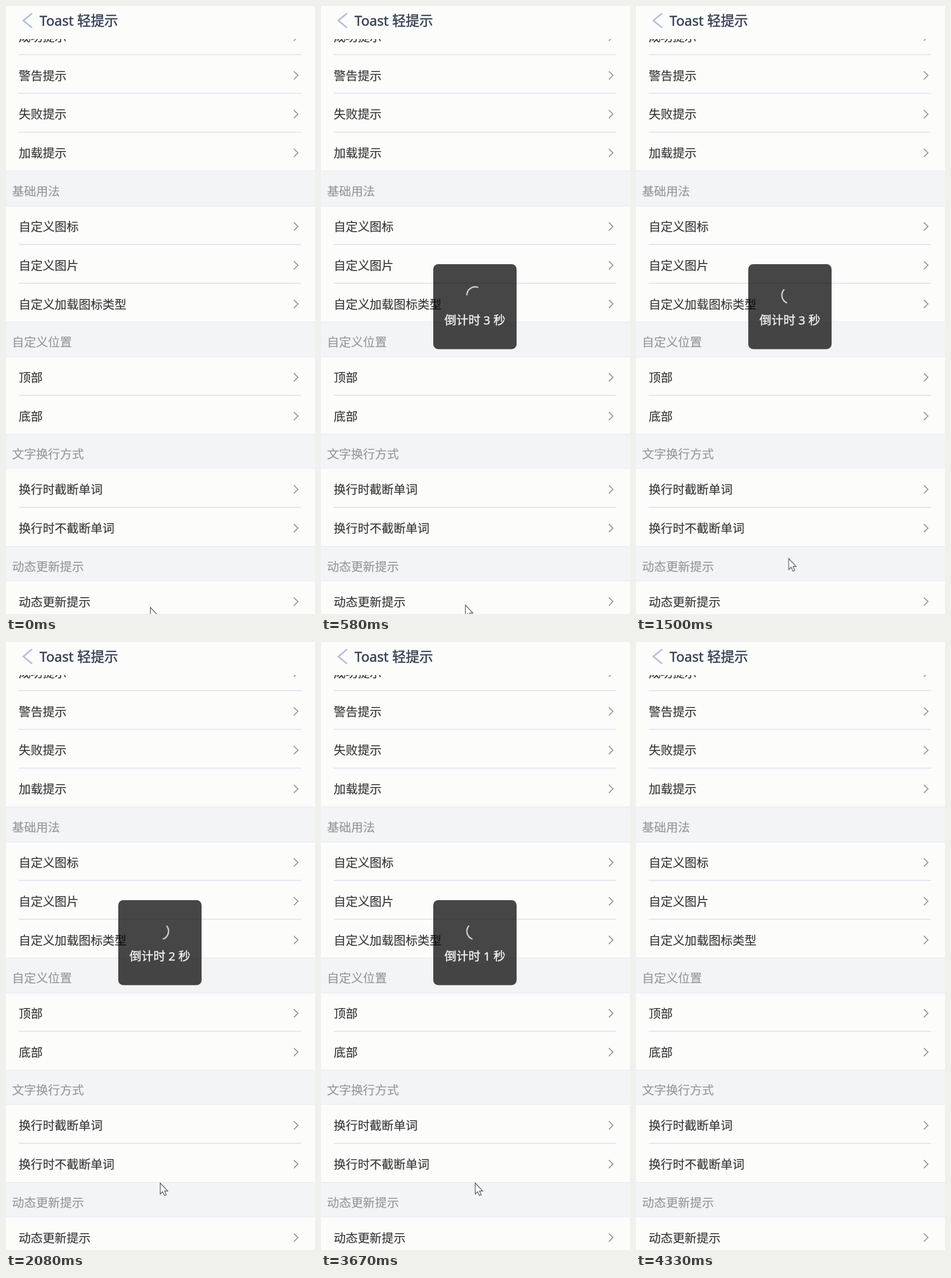
These frames come from a looping animation (534x1048 px, 4410 ms). An HTML page:

```html
<!DOCTYPE html>
<html lang="zh-CN">
<head>
<meta charset="utf-8">
<title>Toast 轻提示</title>
<style>
  html, body { margin: 0; width: 100%; height: 100%; overflow: hidden; background: #fcfcfb; }
  svg { display: block; width: 534px; height: 1048px; }
  text { font: 20.7px "Noto Sans", "Noto Sans CJK SC", "Noto Sans CJK", sans-serif; white-space: pre; }
  .row { fill: #383838; stroke: #383838; stroke-width: .2; }
  .group { fill: #97989a; stroke: #97989a; stroke-width: .2; }
  .title { font-size: 23.6px; font-weight: 500; fill: #364055; stroke: #364055; stroke-width: .5; }
  .line { stroke: #dedef2; stroke-width: 1.5; }
  .chev { fill: none; stroke: #999; stroke-width: 1.8; }
  .toast, .count, .arc, .cursor { animation: 4410ms infinite; }
  .toast { animation-name: toast; animation-timing-function: step-end; }
  .count {
    fill: #f4f4f4; stroke: #f4f4f4; stroke-width: .35; text-anchor: middle;
    opacity: 0; animation-timing-function: step-end;
  }
  .three { animation-name: three; }
  .two { animation-name: two; }
  .one { animation-name: one; }
  .arc { animation-name: spin; animation-timing-function: linear; }
  .cursor { animation-name: move; animation-timing-function: linear; }
  @keyframes toast { 0% { opacity: 0 } 11.34% { opacity: 1 } 85.03%, 100% { opacity: 0 } }
  @keyframes three { 0% { opacity: 1 } 37.41%, 100% { opacity: 0 } }
  @keyframes two { 0% { opacity: 0 } 37.41% { opacity: 1 } 61.22%, 100% { opacity: 0 } }
  @keyframes one { 0% { opacity: 0 } 61.22%, 100% { opacity: 1 } }
  @keyframes spin {
    0%, 11.34% { transform: rotate(301deg) }
    13.15% { transform: rotate(325deg) }
    26.53% { transform: rotate(500deg) }
    47.17% { transform: rotate(825deg) }
    62.36% { transform: rotate(1080deg) }
    83.22% { transform: rotate(1335deg) }
    85.03%, 100% { transform: rotate(1357deg) }
  }
  @keyframes move {
    0% { transform: translate(249px, 1036px) }
    13.15% { transform: translate(249px, 1032px) }
    26.53% { transform: translate(259px, 985px) }
    38.5%, 88.9% { transform: translate(266px, 932px); opacity: 1 }
    88.91%, 100% { transform: translate(266px, 932px); opacity: 0 }
  }
</style>
</head>
<body>
<svg viewBox="0 0 534 1048">
  <g id="list"></g>
  <rect width="534" height="57" fill="#fcfcfb"/>
  <path d="M45 12.5L30 25L45 37.5" fill="none" stroke="#b5bddf" stroke-width="2.8"/>
  <text class="title" x="58" y="34.4">Toast 轻提示</text>
  <g class="toast">
    <rect x="194" y="445" width="144" height="146.5" rx="8.5" fill="#000" fill-opacity=".72"/>
    <g transform="translate(266.5 498.5)">
      <path class="arc" d="M-12-8.1A14.5 14.5 0 0 1 12-8.1" fill="none" stroke="#dedede" stroke-width="2.2"/>
    </g>
    <text class="count three" x="266" y="549">倒计时 3 秒</text>
    <text class="count two" x="266" y="549">倒计时 2 秒</text>
    <text class="count one" x="266" y="549">倒计时 1 秒</text>
  </g>
  <path class="cursor" d="M.5.5V19.5L4.7 15.6L7.8 22.3L11 20.9L8 14.4H13.4Z" fill="#fff" stroke="#555" stroke-width="1.2"/>
</svg>
<script>
  const pitch = 66.8;
  const blocks = [
    [53, '成功提示', '警告提示', '失败提示', '加载提示'],
    [380.2, '自定义图标', '自定义图片', '自定义加载图标类型'],
    [640.2, '顶部', '底部'],
    [833.4, '换行时截断单词', '换行时不截断单词'],
    [1026.8, '动态更新提示']
  ];
  const groups = [
    [284, 345, '基础用法'], [544.5, 605, '自定义位置'],
    [738, 797, '文字换行方式'], [931.5, 991, '动态更新提示']
  ];

  const label = (cls, x, mid, s) => `<text class="${cls}" x="${x}" y="${Math.round(mid + 7.7)}">${s}</text>`;
  const row = (y, s) => label('row', 22, y, s) +
    `<path class="chev" d="M497.5 ${y - 7.2}l7 7l-7 7"/>`;
  const line = y => `<path class="line" d="M22 ${y}H510"/>`;
  const block = ([top, ...names]) => names.map((s, i) =>
    (i ? line(top + i * pitch - 36) : '') + row(top + i * pitch, s)).join('');
  const group = ([top, end, s]) =>
    `<rect y="${top}" width="534" height="${end - top}" fill="#f2f4f6"/>` +
    `<path d="M0 ${top}H534M0 ${end}H534" stroke="#e6eaf0"/>` +
    label('group', 10.5, (top + end) / 2 + 4.7, s);

  document.getElementById('list').innerHTML =
    groups.map(group).join('') + blocks.map(block).join('');
</script>
</body>
</html>
```
